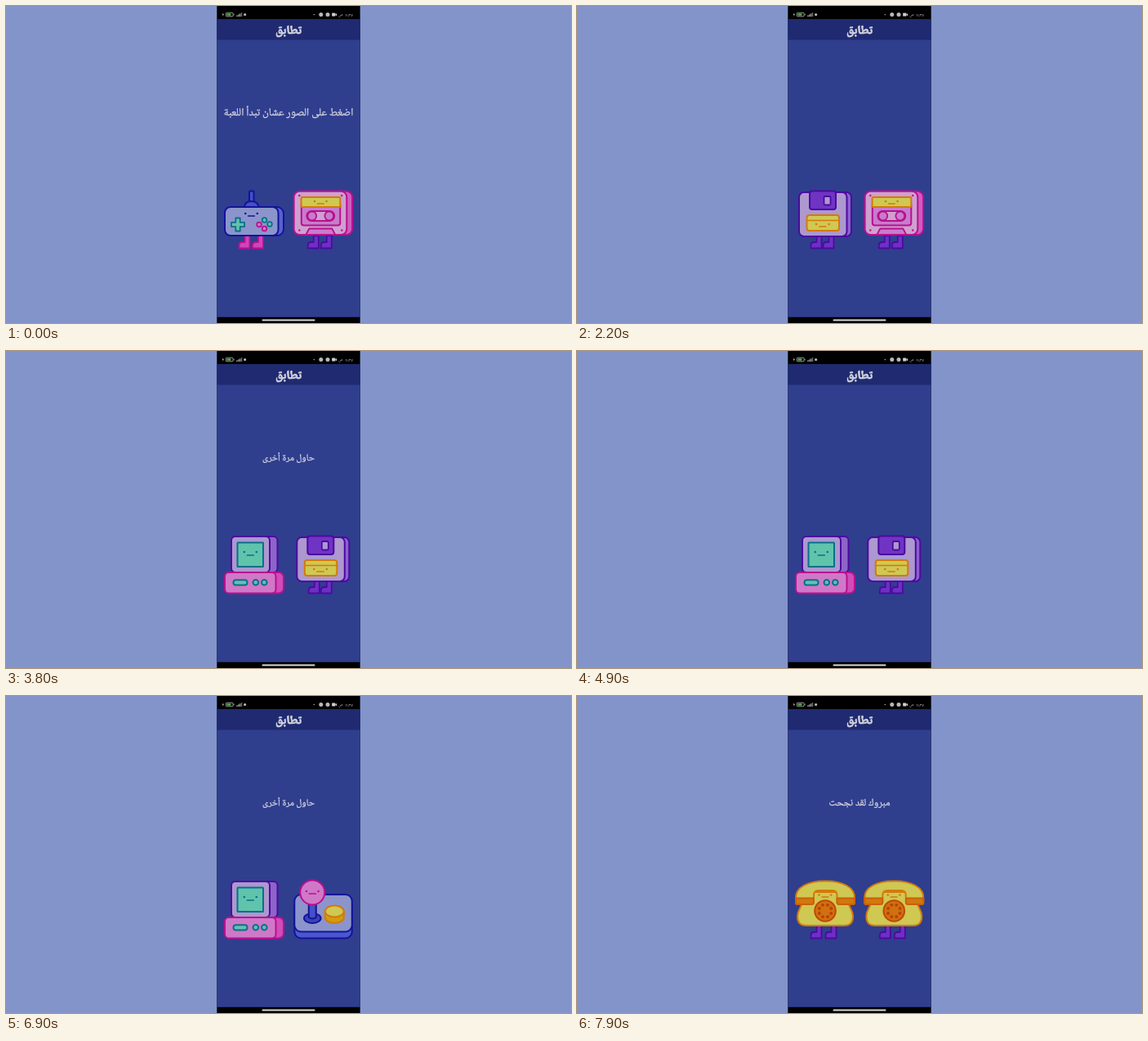
An HTML page for the animation above (8000 ms loop, 692 by 388 pixels).

```html
<!DOCTYPE html>
<html lang="ar">
<head>
<meta charset="utf-8">
<style>
html, body { margin: 0; width: 100%; height: 100%; overflow: hidden; background: #8294ca; }
svg { display: block; width: 692px; height: 388px; }
text { font-family: "Noto Naskh Arabic", Amiri, "DejaVu Sans", serif; text-anchor: middle; direction: rtl; fill: #d2d3de; }
.message { stroke: #d2d3de; stroke-width: 0.3px; }
#title { font-weight: bold; stroke: #d2d3de; stroke-width: 0.7px; }
</style>
</head>
<body>
<svg id="stage" viewBox="0 0 692 388"></svg>
<script>
const LOOP = 8000;
const SLOT_GAP = 84.3;

const BLUE = "#14139a", PINK = "#b8108f", PURPLE = "#4c0aa0", TEAL = "#08708c", ORANGE = "#d27a0c";
const YELLOW = "#cfc852", MINT = "#66c0ac", LILAC = "#ad98cf", SKY = "#8b95cb", ROSE = "#d078c8";

// Shape helpers: x1, y1, x2, y2 are the edges of the outline.
const box = (x1, y1, x2, y2, r, fill, line, w = 2) =>
  `<rect x="${x1}" y="${y1}" width="${x2 - x1}" height="${y2 - y1}" rx="${r}" fill="${fill}" stroke="${line}" stroke-width="${w}"/>`;
const oval = (x, y, rx, ry, fill, line = "none", w = 2) =>
  `<ellipse cx="${x}" cy="${y}" rx="${rx}" ry="${ry}" fill="${fill}" stroke="${line}" stroke-width="${w}"/>`;
const path = (d, fill, line = "none", w = 2) =>
  `<path d="${d}" fill="${fill}" stroke="${line}" stroke-width="${w}" stroke-linejoin="round" stroke-linecap="round"/>`;
const face = (x, y, eye, mouth, drop, color) =>
  oval(x - eye, y, 1.3, 1.3, color) + oval(x + eye, y, 1.3, 1.3, color) +
  path(`M${x - mouth} ${y + drop}h${mouth * 2}`, "none", color, 1.7);
const cross = (x, y, arm, half, fill, line) => {
  const n = arm - half, s = half * 2;
  return path(`M${x - half} ${y - arm}h${s}v${n}h${n}v${s}h${-n}v${n}h${-s}v${-n}h${-n}v${-s}h${n}z`, fill, line, 1.8);
};
const boots = (x, gap, fill, line) => [x, x + gap].map(b =>
  path(`M${b + 7} 281v8h-3q-4 0 -4 4v3.5h13v-15.5z`, fill, line, 1.8)).join("");

const dialHoles = Array.from({ length: 8 }, (_, i) => {
  const a = i * Math.PI / 4 + Math.PI / 8;
  return oval(304 + 7.8 * Math.cos(a), 263 + 7.8 * Math.sin(a), 1.9, 1.9, "#b8400a");
}).join("");

const sprites = {
  pad:
    boots(285.5, 16.5, "#d442b8", PINK) +
    box(298, 226.5, 303.5, 242, 1, "#4450c4", BLUE) +
    path("M292 247q0 -8 8.5 -8t9 8z", "#4450c4", BLUE) +
    box(290, 246, 340, 281, 8, "#5563cb", BLUE) +
    box(268, 246, 333.5, 281, 7, SKY, BLUE) +
    face(300.5, 254, 7.3, 3.8, 3, BLUE) +
    cross(284, 267.5, 8, 2.7, MINT, TEAL) +
    oval(316.5, 262, 2.8, 2.8, MINT, TEAL, 1.8) + oval(323, 267, 2.8, 2.8, MINT, TEAL, 1.8) +
    oval(310, 267.5, 2.8, 2.8, ROSE, PINK, 1.8) + oval(316.5, 272.5, 2.8, 2.8, ROSE, PINK, 1.8),

  tape:
    boots(285.5, 16, "#6e2fc4", PURPLE) +
    box(280, 226.8, 339.8, 280, 7, "#cf5cc0", PINK) +
    box(268.3, 226.8, 333, 280, 7, "#cfa0cf", PINK) +
    [[275, 232], [327, 232], [275, 274.5], [327, 274.5]].map(p => oval(...p, 1.2, 1.2, PINK)).join("") +
    box(277.5, 240, 325, 268.5, 3, "#c87ccb", PINK) +
    box(277.3, 234, 325, 246, 1, YELLOW, ORANGE) +
    face(301, 239, 7.3, 3.8, 3, ORANGE) +
    box(284, 251, 318, 263, 6, "#cfa0cf", PINK, 1.8) +
    oval(290.5, 257, 5.4, 5.4, "#c87ccb", PINK, 1.8) + oval(311.5, 257, 5.4, 5.4, "#c87ccb", PINK, 1.8) +
    path("M283 280l4 -7.5h28l4 7.5z", "#c87ccb", PINK, 1.8),

  disk:
    boots(286.5, 15, "#6e2fc4", PURPLE) +
    box(282, 228, 336, 282, 6, "#8a62cc", PURPLE) +
    box(272, 228, 330.5, 282, 6, LILAC, PURPLE) +
    box(285, 226.5, 317, 249, 3, "#7034c4", PURPLE) +
    box(302.5, 233, 310.5, 243.5, 1.5, LILAC, PURPLE, 1.8) +
    box(281.5, 256, 321, 275, 3, YELLOW, ORANGE) +
    path("M282 262.5h39", "none", ORANGE, 1.7) +
    face(300.8, 267, 7.8, 4, 3, ORANGE),

  handheld:
    boots(284.5, 16, "#d0700c", "#b8480a") +
    box(288, 227, 329, 281.5, 6, "#1aa398", TEAL) +
    box(279, 227, 320.5, 281.5, 6, MINT, TEAL) +
    box(286, 233.5, 313.5, 255.5, 0.5, LILAC, PURPLE) +
    face(299.5, 242, 7.2, 3.8, 4, PURPLE) +
    cross(291.2, 267.5, 6, 2.1, LILAC, PURPLE) +
    oval(303.5, 270.3, 2.9, 2.9, LILAC, PURPLE, 1.9) + oval(310.5, 265, 2.9, 2.9, LILAC, PURPLE, 1.9),

  computer:
    box(286, 227, 332.5, 271, 5, "#8e64c9", PURPLE) +
    box(276, 227, 323, 271, 5, LILAC, PURPLE) +
    box(283.5, 234.5, 315, 264, 0.5, "#60c3ac", TEAL) +
    face(299.3, 246, 7.5, 3.9, 4, TEAL) +
    box(282, 271, 340, 296.5, 6, "#d04cb8", PINK) +
    box(268, 271, 330.5, 296.5, 5, ROSE, PINK) +
    box(278.5, 280.2, 295.5, 286.4, 3, MINT, TEAL) +
    oval(305.8, 283.2, 3.3, 3.3, MINT, TEAL) + oval(316.3, 283.2, 3.3, 3.3, MINT, TEAL),

  stick:
    box(269, 250, 339.5, 296.5, 8, "#4a58cc", BLUE) +
    box(269, 243, 339.5, 288.5, 8, SKY, BLUE) +
    oval(291, 272, 10.3, 6, "#3a44b4", BLUE) +
    path("M286.5 252v19q4.5 3 9 0v-19z", "#4450c4", BLUE) +
    oval(291, 240.5, 15, 15, ROSE, PINK) +
    face(291, 239, 7.3, 4, 3, PINK) +
    path("M306.5 264v7a11.5 7 0 0 0 23 0v-7z", "#d09c10", ORANGE) +
    oval(318, 263.5, 11.5, 7, YELLOW, ORANGE),

  phone:
    boots(286.5, 18, "#6e2fc4", PURPLE) +
    path("M276 250C276 259 270 260 270 270C270 277 274 281 281 281H327C334 281 338 277 338 270C338 260 332 259 332 250V240H276z", YELLOW, ORANGE) +
    path("M268 248C267 234 283 226.5 304 226.5S341 234 340 248V253q0 2 -2 2H321q-2.5 0 -2.5 -3V244q0 -6 -6 -6H296q-6 0 -6 6V252q0 3 -2.5 3H270q-2 0 -2 -2z", YELLOW, ORANGE) +
    path("M268 247.5h22v4.5q0 3 -2.5 3H270q-2 0 -2 -2zM318.5 247.5H340v5.5q0 2 -2 2H321q-2.5 0 -2.5 -3z", "#d0780e", "#cc600c", 1.8) +
    face(303.8, 243.5, 7.3, 3.8, 2.5, ORANGE) +
    oval(304, 263, 12.8, 12.8, "#d0700e", "#c0480a") + dialHoles
};

const messages = {
  start: ["اضغط على الصور عشان تبدأ اللعبة", 159],
  retry: ["حاول مرة أخرى", 64],
  win: ["مبروك لقد نجحت", 75]
};

// Each turn: start, time its message clears, left picture, right picture, message
const turns = [
  [0, 500, "pad", "tape", "start"],
  [1000, 2200, "disk", "tape", "retry"],
  [2400, 2900, "handheld", "computer", "retry"],
  [3700, 4800, "computer", "disk", "retry"],
  [5300, 5900, "handheld", "handheld", "win"],
  [6800, 7500, "computer", "stick", "retry"],
  [7700, LOOP, "phone", "phone", "win"]
];

const area = (x, y, w, h, fill, r = 0) => `<rect x="${x}" y="${y}" width="${w}" height="${h}" rx="${r}" fill="${fill}"/>`;
const GREY = "#b9b9b9";
const signal = [0, 1, 2, 3].map(i => area(282.3 + i * 1.9, 11.4 - i * 1.1, 1.2, 1.6 + i * 1.1, i < 3 ? GREY : "#777")).join("");
const statusBar =
  path("M266.3 8l-1.8 2.8h1.3l-.5 2.2 1.8-2.9h-1.3z", GREY) +
  box(269.3, 8.2, 278, 12.8, 1, "none", GREY, 0.8) + area(270.4, 9.3, 5, 2.4, "#58b848") + area(278.6, 9.6, 0.9, 1.8, GREY) +
  signal + oval(292.6, 10.5, 1.6, 1.6, GREY) +
  oval(377.3, 10.5, 0.7, 0.7, GREY) + oval(385.8, 10.5, 2.5, 2.5, GREY) + oval(394, 10.5, 2.5, 2.5, GREY) +
  area(399.2, 8.6, 4.2, 4, "#d0d0d0", 0.7) + path("M403.4 10.2l1.8 -1.2v3.2l-1.8 -1.2z", "#d0d0d0") +
  `<text x="410" y="12.2" font-size="5">ص</text><text x="420" y="12.5" font-size="5.5">١١:٣٧</text>`;

const stage = document.getElementById("stage");
stage.innerHTML =
  `<defs>${Object.entries(sprites).map(([id, art]) => `<g id="${id}">${art}</g>`).join("")}</defs>` +
  area(0, 0, 692, 388, "#8294ca") +
  area(258.3, 0, 175.4, 388, "#000") + area(258.3, 16.2, 175.4, 364.6, "#303e8e") + area(258.3, 16.2, 175.4, 25.3, "#1f2a70") +
  area(313.5, 383.5, 65, 2, "#d8d8d8", 1) + statusBar +
  `<text id="title" x="346" y="33.5">تطابق</text>` +
  Object.entries(messages).map(([id, m]) => `<text id="${id}" class="message" x="346" y="134">${m[0]}</text>`).join("") +
  `<use id="left"/><use id="right" x="${SLOT_GAP}"/>`;

const get = id => document.getElementById(id);

// Picks the font size at which a line has the wanted length.
function sizeText(id, length) {
  const el = get(id);
  el.setAttribute("font-size", 20);
  el.setAttribute("font-size", 20 * length / el.getComputedTextLength());
}
sizeText("title", 32);
for (const id in messages) sizeText(id, messages[id][1]);

function draw(time) {
  const [, clears, left, right, message] = turns.findLast(turn => turn[0] <= time);
  get("left").setAttribute("href", "#" + left);
  get("right").setAttribute("href", "#" + right);
  for (const id in messages) {
    get(id).setAttribute("visibility", id === message && time < clears ? "visible" : "hidden");
  }
}

function tick() {
  draw(performance.now() % LOOP);
  requestAnimationFrame(tick);
}
tick();
</script>
</body>
</html>
```
